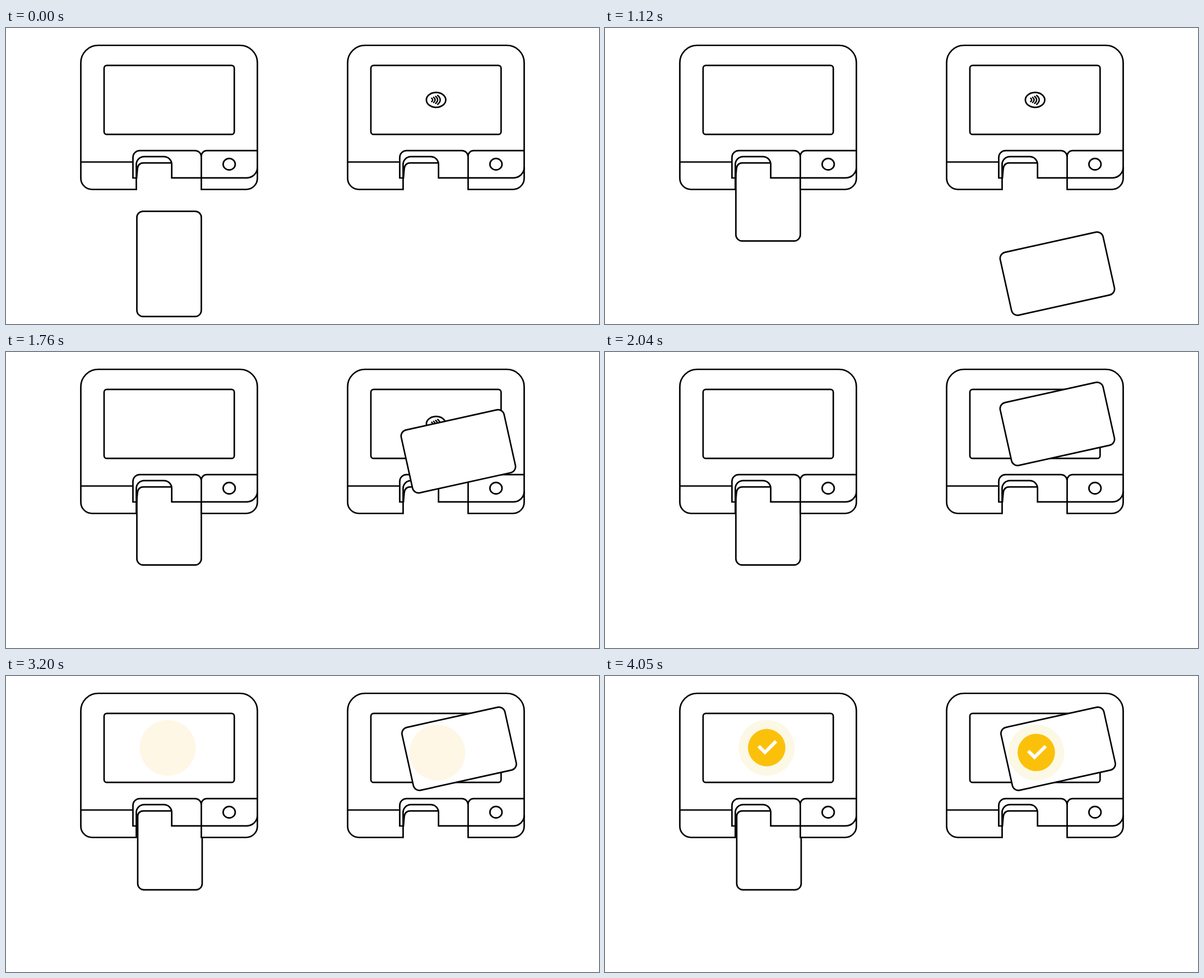
An HTML page that plays this animation: 1058x529 px, repeating every 5350 ms.

```html
<!DOCTYPE html>
<html lang="en">
<head>
<meta charset="utf-8">
<title>Card payment</title>
<style>
  html, body { margin: 0; width: 100%; height: 100%; overflow: hidden; background: #fff; }
  svg { display: block; width: 100vw; height: 100vh; }
  .line { fill: none; stroke: #000; stroke-width: 2.7; }
  .card { fill: #fff; stroke: #000; stroke-width: 2.7; }
  .arc { fill: none; stroke: #ffc20a; stroke-width: 3; stroke-linecap: round; }
  .disc { fill: #fbc10a; }
  .tick { fill: none; stroke: #fff; stroke-width: 6; }
</style>
</head>
<body>
<svg viewBox="0 0 1058 529">
  <defs>
    <g id="terminal" class="line">
      <path d="M232.5 288.5H153.5A20 20 0 0 1 133.5 268.5V62A31 31 0 0 1 164.5 31H417.5A31 31 0 0 1 448.5 62V268.5A20 20 0 0 1 428.5 288.5H348.5"/>
      <rect x="175" y="66.8" width="232.3" height="123.4" rx="5"/>
      <path d="M133.5 239.5H226.5M232.5 268H226.5V231A12 12 0 0 1 238.5 219.2H337.5A11 11 0 0 1 348.5 230V289.8"/>
      <path d="M348.5 229A9.8 9.8 0 0 1 358.3 219.2H448.5M448.5 249A18.8 18.8 0 0 1 429.7 267.8H295.7V244A14 14 0 0 0 281.7 229.8H246.5A14 14 0 0 0 232.5 244V289.8"/>
      <path d="M233 269L234.5 252Q235.5 241.2 245.5 241.2H295.7"/>
      <ellipse cx="398.2" cy="243.4" rx="10.8" ry="10.2"/>
    </g>
    <clipPath id="slot">
      <path d="M232 289V270L234.5 252Q235.5 241.2 245.5 241.2H295.7V267.8H348.5V289H370V529H210V289Z"/>
    </clipPath>
    <g id="status">
      <circle class="halo" r="50" cy=".4"/>
    </g>
  </defs>

  <g clip-path="url(#slot)">
    <rect id="dipCard" class="card" x="233.5" y="327.6" width="115" height="188" rx="11"/>
  </g>
  <use href="#terminal"/>
  <use href="#terminal" x="476"/>
  <g class="line">
    <ellipse cx="767.3" cy="128.5" rx="17.3" ry="13.3"/>
    <g id="waves" stroke-width="2.5" stroke-linecap="round"></g>
  </g>
  <rect id="tapCard" class="card" x="-94" y="-57.5" width="188" height="115" rx="11"/>
  <g class="status" transform="translate(288.5 128)"></g>
  <g class="status" transform="translate(769.5 136.6)"></g>
</svg>
<script>
const LOOP = 5350, STEP = 40;
const DIP = { start: 0, length: 990, rise: 135 };
const TAP = { start: 1120, length: 912, rise: 310.5 };
const STATUS_AT = 2160, DONE_AT = 3570;
const ARC = { radius: 32, from: -65, to: 295, span: 23, speed: 0.375 };

const $ = (id) => document.getElementById(id);
const clamp = (v, lo = 0, hi = 1) => Math.min(hi, Math.max(lo, v));

$('waves').innerHTML = [[759.5, 3, 3.5], [763, 4.6, 5.2], [766.6, 6.2, 7], [770.2, 8, 9]]
  .map(([x, h, bulge]) => `<path d="M${x} ${128.5 - h}q${bulge} ${h} 0 ${2 * h}"/>`).join('');

const badges = [...document.querySelectorAll('.status')];
for (const badge of badges) {
  badge.innerHTML = `<circle class="halo" r="50" cy=".4"/><path class="arc"/>
    <circle class="disc"/>
    <path class="tick" pathLength="100" d="M-14.3-2.6L-3.2 8.6L16.7-11.3"/>`;
}

// cubic-bezier(.5, 0, .5, 1) by bisection
function ease(u) {
  if (u <= 0 || u >= 1) return clamp(u);
  let lo = 0, hi = 1;
  for (let i = 0; i < 24; i++) {
    const s = (lo + hi) / 2;
    if (1.5 * s * (1 - s) + s ** 3 < u) lo = s; else hi = s;
  }
  return lo * lo * (3 - 2 * lo);
}

const lift = (move, t) => -move.rise * ease((t - move.start) / move.length);

function arcPath(t) {
  const head = ARC.from + (t - STATUS_AT) * ARC.speed;
  const a = clamp(head - ARC.span, ARC.from, ARC.to);
  const b = clamp(head, ARC.from, ARC.to);
  if (b - a < 0.5) return '';
  const point = (deg) => {
    const r = deg * Math.PI / 180;
    return `${ARC.radius * Math.cos(r)} ${ARC.radius * Math.sin(r) + 0.4}`;
  };
  return `M${point(a)}A${ARC.radius} ${ARC.radius} 0 0 1 ${point(b)}`;
}

function drawBadge(badge, t) {
  const [halo, arc, disc, tick] = badge.children;
  const done = t >= DONE_AT;
  badge.style.display = t >= STATUS_AT ? '' : 'none';
  halo.setAttribute('fill', done ? '#fcf8e6' : '#fff7e6');
  arc.setAttribute('d', arcPath(t));
  const grow = clamp((t - DONE_AT + STEP) / 320);
  const drawn = clamp((t - DONE_AT - 200) / 280);
  disc.setAttribute('r', done ? 33.4 * (1 - (1 - grow) ** 2) : 0);
  tick.style.display = drawn > 0 ? '' : 'none';
  tick.setAttribute('stroke-dasharray', drawn < 1 ? `${100 * ease(drawn)} 200` : 'none');
}

function draw(time) {
  const base = time < DONE_AT ? 0 : DONE_AT;
  const t = base + Math.floor((time - base) / STEP) * STEP;
  const nudge = t >= STATUS_AT ? 1.5 : 0;
  $('dipCard').setAttribute('transform', `translate(${nudge} ${lift(DIP, t) + nudge})`);
  $('tapCard').style.display = t >= TAP.start ? '' : 'none';
  $('tapCard').setAttribute('transform',
    `translate(${807 + nudge} ${439 + lift(TAP, t) + nudge}) rotate(-12.5)`);
  badges.forEach((badge) => drawBadge(badge, t));
}

const began = performance.now();
function tick() {
  draw((performance.now() - began) % LOOP);
  requestAnimationFrame(tick);
}
tick();
</script>
</body>
</html>
```
